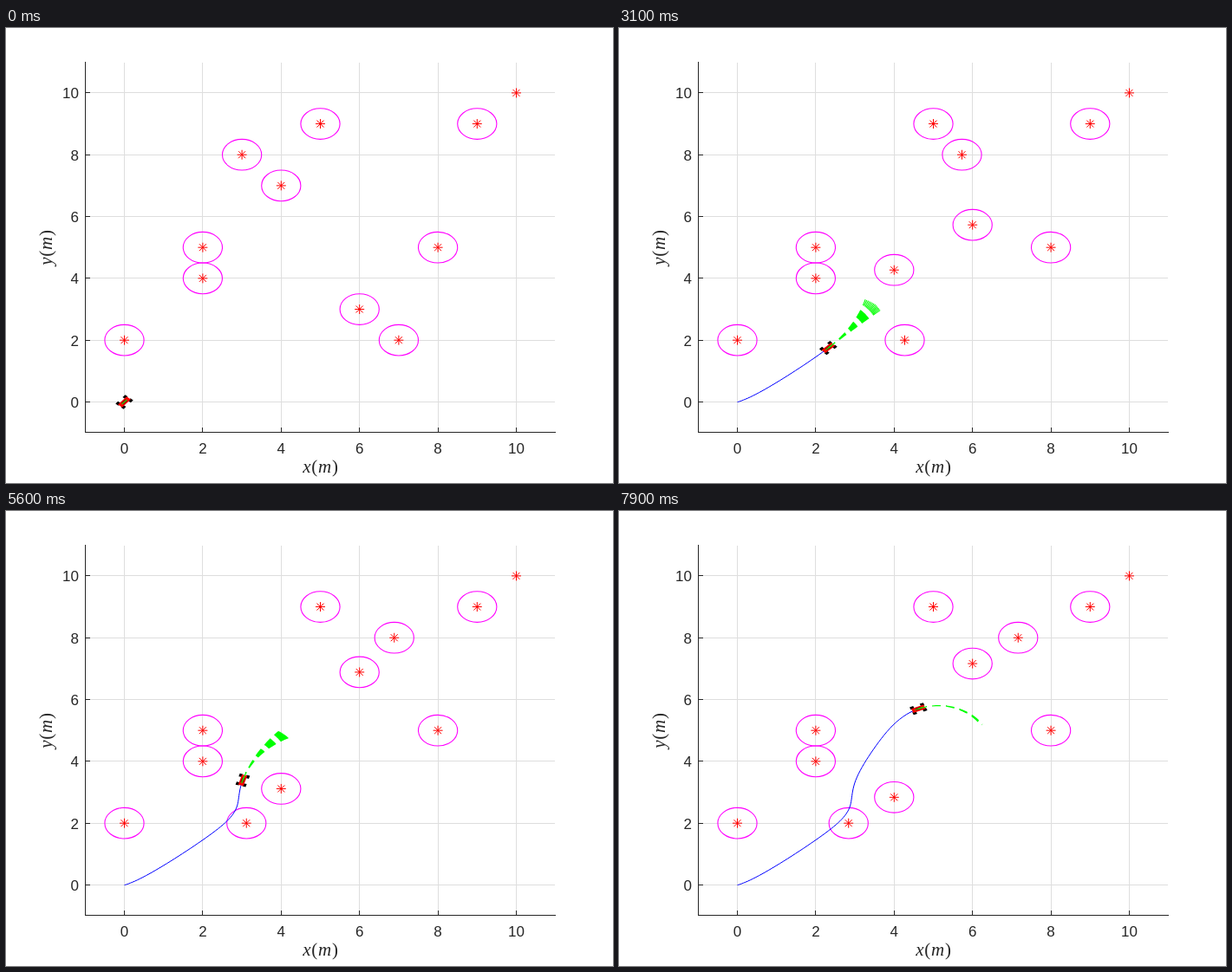
An HTML page for the animation above (8000 ms loop, 700 px wide and 525 px high).

```html
<!DOCTYPE html>
<html lang="en">
<head>
<meta charset="utf-8">
<title>Path planning among moving obstacles</title>
<style>
  html, body { margin: 0; width: 100%; height: 100%; overflow: hidden; background: #fff; }
  svg { display: block; width: 700px; height: 525px; }
  text { fill: #262626; }
  .tick { font: 17px "Liberation Sans", Arial, sans-serif; }
  .label { font: 21px "Liberation Serif", Times, serif; letter-spacing: .8px; text-anchor: middle; }
  .label tspan { font-style: italic; }
  path { fill: none; stroke-width: 1; }
  .grid { stroke: #262626; stroke-opacity: .15; shape-rendering: crispEdges; }
  .axis { stroke: #262626; shape-rendering: crispEdges; }
  .star { stroke: #f00; }
  .zone { fill: none; stroke: #f0f; stroke-width: 1.1; }
  #trail { stroke: #00f; }
  #fan { stroke: #0f0; stroke-dasharray: 10 6; stroke-width: 1.1; }
</style>
</head>
<body>
<svg id="stage" viewBox="0 0 700 525">
  <path id="grid" class="grid"/>
  <path id="axis" class="axis"/>
  <g id="ticks"></g>
  <text class="label" x="363" y="513"><tspan>x</tspan>(<tspan>m</tspan>)</text>
  <text class="label" transform="translate(53 253) rotate(-90)"><tspan>y</tspan>(<tspan>m</tspan>)</text>
  <g id="marks"></g>
  <path id="trail"/>
  <g id="car">
    <g id="wheels"></g>
    <rect x="-.17" y="-.07" width=".34" height=".14" fill="#f00"/>
    <rect x="-.08" y="-.045" width=".16" height=".09" fill="#900"/>
    <rect x="-.1" y="-.015" width=".2" height=".03" fill="#3c0"/>
  </g>
  <path id="fan"/>
</svg>
<script>
const LOOP = 8000, STEP = 100;
const SX = 45.2, SY = 35.66;
const px = x => 136.5 + SX * x;
const py = y => 431.5 - SY * y;
const $ = id => document.getElementById(id);

function add(parent, tag, attrs, text) {
  const el = document.createElementNS("http://www.w3.org/2000/svg", tag);
  for (const key in attrs) el.setAttribute(key, attrs[key]);
  if (text !== undefined) el.textContent = text;
  parent.appendChild(el);
  return el;
}

// Waypoints [step, x, y]; mirroring the second one starts the car from rest.
const WAYPOINTS = [
  [-9, .33, .16], [0, 0, 0], [9, .33, .16], [20, 1.28, .85], [31, 2.32, 1.75],
  [40, 2.77, 2.29], [45, 2.88, 2.57], [56, 3.02, 3.39], [66, 3.54, 4.51],
  [79, 4.62, 5.7], [92, 6.3, 5.72]
];
// Obstacle travel [step, distance], at constant speed in between
const TRAVEL = [[0, 0], [9, .31], [35, 3.17], [57, 3.92], [69, 5.06], [79, 4.163]];

const locate = (keys, t) => {
  let i = 0;
  while (i < keys.length - 2 && keys[i + 1][0] <= t) i++;
  return i;
};

function travel(t) {
  const i = locate(TRAVEL, t), [t0, d0] = TRAVEL[i], [t1, d1] = TRAVEL[i + 1];
  return d0 + (d1 - d0) * (t - t0) / (t1 - t0);
}

// Natural cubic spline through column k of the keys
function spline(keys, k) {
  const last = keys.length - 1;
  const gap = i => keys[i + 1][0] - keys[i][0];
  const slope = i => (keys[i + 1][k] - keys[i][k]) / gap(i);
  const bend = Array(last + 1).fill(0), carry = Array(last + 1).fill(0);
  for (let i = 1; i < last; i++) {
    const pivot = 2 * (gap(i - 1) + gap(i)) - gap(i - 1) * carry[i - 1];
    carry[i] = gap(i) / pivot;
    bend[i] = (6 * (slope(i) - slope(i - 1)) - gap(i - 1) * bend[i - 1]) / pivot;
  }
  for (let i = last - 1; i > 0; i--) bend[i] -= carry[i] * bend[i + 1];
  return t => {
    const i = locate(keys, t), h = gap(i), b = (t - keys[i][0]) / h, a = 1 - b;
    return a * keys[i][k] + b * keys[i + 1][k] +
      ((a ** 3 - a) * bend[i] + (b ** 3 - b) * bend[i + 1]) * h * h / 6;
  };
}

const carX = spline(WAYPOINTS, 1), carY = spline(WAYPOINTS, 2);

function motion(t) {
  const h = .05, vx = (carX(t + h) - carX(t)) / h, vy = (carY(t + h) - carY(t)) / h;
  return { speed: Math.hypot(vx, vy), angle: Math.atan2(vy, vx) };
}

function drawAxes() {
  let grid = "", axis = "M91.5 39V466.5H634";
  for (let v = 0; v <= 10; v += 2) {
    const x = Math.floor(px(v)) + .5, y = Math.floor(py(v)) + .5;
    grid += `M${x} 40V466M92 ${y}H633`;
    axis += `M${x} 466V461M92 ${y}H97`;
    add($("ticks"), "text", { class: "tick", x: px(v), y: 491, "text-anchor": "middle" }, v);
    add($("ticks"), "text", { class: "tick", x: 84, y: py(v) + 6.5, "text-anchor": "end" }, v);
  }
  $("grid").setAttribute("d", grid);
  $("axis").setAttribute("d", axis);
}

function mark(x, y, ringed) {
  const g = add($("marks"), "g", {});
  add(g, "path", { class: "star", d: "M-5.5 0H5.5M0-5.5V5.5M-4-4L4 4M-4 4L4-4" });
  if (ringed) add(g, "ellipse", { class: "zone", rx: SX / 2, ry: SY / 2 });
  const place = (dx, dy) => g.setAttribute("transform", `translate(${px(x + dx)} ${py(y + dy)})`);
  place(0, 0);
  return place;
}

drawAxes();
mark(10, 10, false);
for (const [x, y] of [[0, 2], [2, 4], [2, 5], [5, 9], [8, 5], [9, 9]]) mark(x, y, true);
const movers = [[3, 8, 1, 0], [4, 7, 0, -1], [6, 3, 0, 1], [7, 2, -1, 0]]
  .map(([x, y, dx, dy]) => ({ place: mark(x, y, true), dx, dy }));
for (const x of [-.14, .14])
  for (const y of [-.09, .09])
    add($("wheels"), "rect", { x: x - .05, y: y - .045, width: .1, height: .09, fill: "#000" });

// Candidate arcs ahead of the car: slow driving shortens them, sharp turns narrow them.
function fanPath(t) {
  const { speed, angle } = motion(t);
  const reach = 1.85 * Math.min(1, speed / .1) ** 2.5;
  if (reach < .03) return "";
  const turn = 15 * (motion(t + .5).angle - motion(t - .5).angle);
  const spread = .3 * Math.max(.1, 1 - turn * turn);
  const arcs = 13, parts = 16;
  let d = "";
  for (let i = 0; i < arcs; i++) {
    const total = turn + spread * (2 * i / (arcs - 1) - 1);
    let x = carX(t), y = carY(t);
    d += `M${px(x).toFixed(2)} ${py(y).toFixed(2)}`;
    for (let j = 0; j < parts; j++) {
      const a = angle + total * (j + .5) / parts;
      x += Math.cos(a) * reach / parts;
      y += Math.sin(a) * reach / parts;
      d += `L${px(x).toFixed(2)} ${py(y).toFixed(2)}`;
    }
  }
  return d;
}

const trail = Array.from({ length: LOOP / STEP },
  (_, t) => `${px(carX(t)).toFixed(2)} ${py(carY(t)).toFixed(2)}`);

let shown = -1;
function draw(t) {
  if (t === shown) return;
  shown = t;
  const d = travel(t);
  for (const m of movers) m.place(m.dx * d, m.dy * d);
  const degrees = motion(t).angle * 180 / Math.PI;
  $("trail").setAttribute("d", "M" + trail.slice(0, t + 1).join("L"));
  $("car").setAttribute("transform",
    `translate(${trail[t]}) scale(${SX} ${-SY}) rotate(${degrees})`);
  $("fan").setAttribute("d", fanPath(t));
}

const start = performance.now();
function tick() {
  draw(Math.floor((performance.now() - start) % LOOP / STEP));
  requestAnimationFrame(tick);
}
tick();
</script>
</body>
</html>
```
